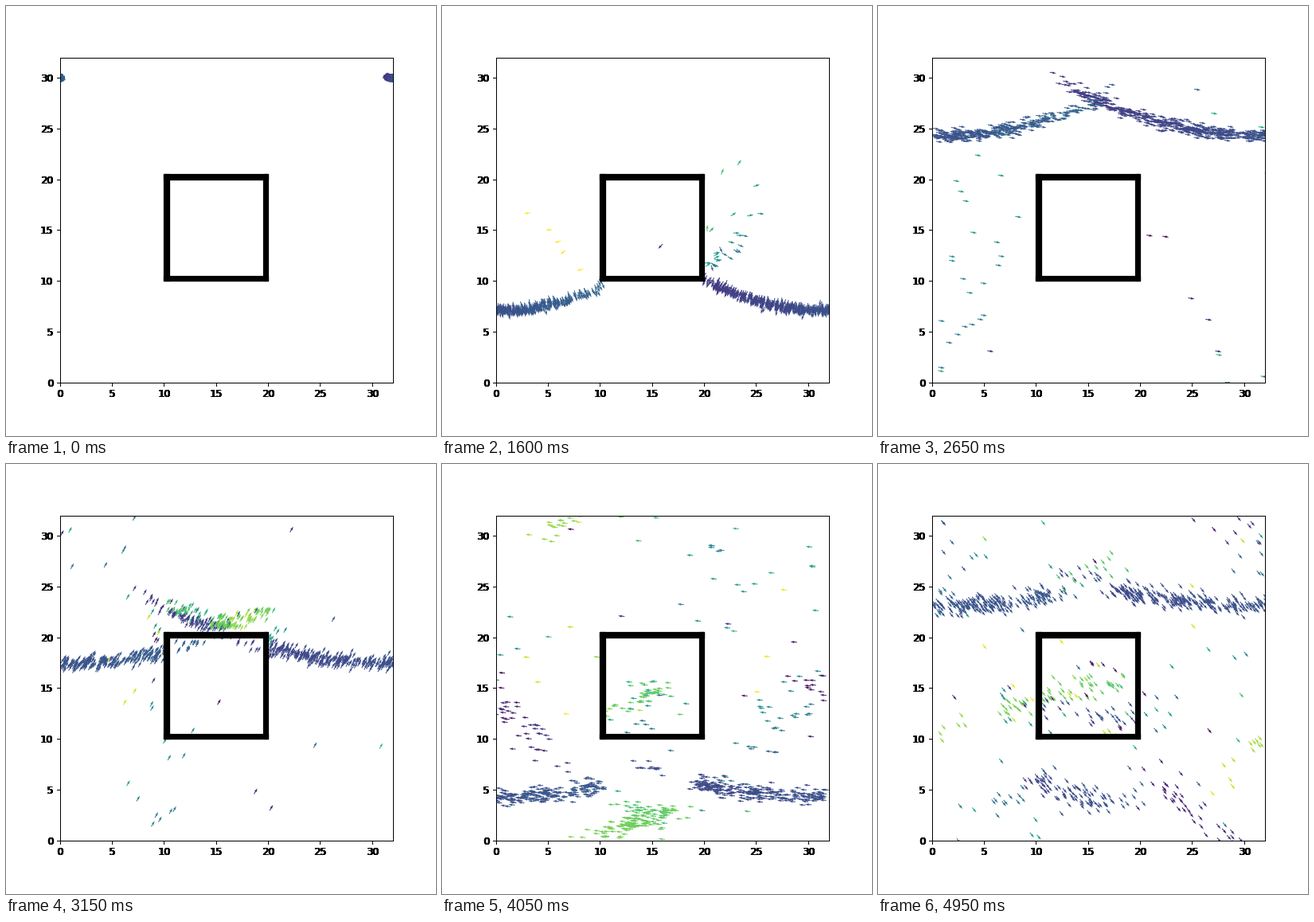
These frames come from a looping animation (540 by 540 pixels, 5 s). A matplotlib script:

```python
import numpy as np
import matplotlib.pyplot as plt
from matplotlib.animation import FuncAnimation
from matplotlib.patches import Rectangle
from matplotlib.transforms import ScaledTranslation

SIZE, DPI = 540, 90
L = 32.0
N = 800
FRAMES = 100
SPEED = 0.718
JITTER = 0.04
TURN_NOISE = 0.025

# Flocking: pull towards the mean heading of close neighbours
ALIGN_START = 45
ALIGN_RADIUS = 1.0
ALIGN_PULL = 0.15

# Wall strips as x0, y0, x1, y1
SIDES = [(10, 10, 10.5, 20.5), (19.5, 10, 20, 20.5)]
CAPS = [(10, 10, 20, 10.5), (10, 20, 20, 20.5)]


def inside(pos, strip):
    x0, y0, x1, y1 = strip
    x, y = pos.T
    return (x > x0) & (x < x1) & (y > y0) & (y < y1)


def align(pos, angle):
    gap = pos[:, None] - pos
    gap -= L * np.round(gap / L)
    near = (gap ** 2).sum(axis=2) < ALIGN_RADIUS ** 2
    unit = np.exp(1j * angle)
    return np.angle(unit + ALIGN_PULL * (near @ unit) / near.sum(axis=1))


def advance(pos, angle, rng):
    step = SPEED * np.column_stack([np.cos(angle), np.sin(angle)])
    return (pos + step + rng.normal(0, JITTER, (N, 2))) % L


def simulate(seed=4):
    """Return positions and headings for every frame."""
    rng = np.random.default_rng(seed)
    angle = -np.pi / 2 + rng.uniform(-0.48, 0.27, N) + rng.normal(0, 0.1, N)
    pos = advance(np.tile([-0.1, 31.0], (N, 1)), angle, rng)
    track = [(pos, angle)]
    for frame in range(1, FRAMES):
        if frame > ALIGN_START:
            angle = align(pos, angle)
        angle = angle + rng.normal(0, TURN_NOISE, N)
        new = advance(pos, angle, rng)

        cap_hit = inside(new, CAPS[0]) | inside(new, CAPS[1])
        side_hit = (inside(new, SIDES[0]) | inside(new, SIDES[1])) & ~cap_hit
        # Caps mirror the heading, sides scatter it around their normal
        bounced = -angle + rng.normal(0, 0.2, N)
        normal = np.where(np.cos(angle) > 0, np.pi, 0.0)
        scattered = normal + rng.normal(0, 0.7, N)
        angle = np.where(cap_hit, bounced, np.where(side_hit, scattered, angle))

        pos = np.where((cap_hit | side_hit)[:, None], pos, new)
        track.append((pos, angle))
    return track


# From this frame on all arrows share one direction
COMMON_START = 50
KEY_FRAMES = [50, 63, 81, 93, 99]
KEY_DEGREES = [-30, 60, 175, 340, 310]


def arrow_angle(frame, angle):
    if frame < COMMON_START:
        return angle
    shared = np.radians(np.interp(frame, KEY_FRAMES, KEY_DEGREES))
    return np.full(N, shared)


track = simulate()

fig = plt.figure(figsize=(SIZE / DPI, SIZE / DPI), dpi=DPI, facecolor="white")
rect = [0.125, 0.125, 0.775, 0.755]
ax = fig.add_axes(rect)

# Stacked copies, half of them nudged, give the heavy tick labels
layers = [ax] + [fig.add_axes(rect, frameon=False) for _ in range(5)]
nudge = ScaledTranslation(1 / DPI, 0, fig.dpi_scale_trans)
for i, layer in enumerate(layers):
    layer.set(xlim=(0, L), ylim=(0, L))
    layer.set_xticks(range(0, 31, 5))
    layer.set_yticks(range(0, 31, 5))
    layer.tick_params(labelsize=10, labelfontfamily="DejaVu Sans")
    if i % 2:
        for label in layer.get_xticklabels() + layer.get_yticklabels():
            label.set_transform(label.get_transform() + nudge)

for x0, y0, x1, y1 in SIDES + CAPS:
    ax.add_patch(Rectangle((x0, y0), x1 - x0, y1 - y0, fc="black", ec="black",
                           lw=1, zorder=2.2))

start, heading = track[0]
arrows = ax.quiver(start[:, 0], start[:, 1], np.cos(heading), np.sin(heading),
                   heading, cmap="viridis", clim=(-np.pi, np.pi), zorder=1.5)


def update(frame):
    pos, angle = track[frame]
    shown = arrow_angle(frame, angle)
    arrows.set_offsets(pos)
    arrows.set_UVC(np.cos(shown), np.sin(shown), angle)
    return (arrows,)


anim = FuncAnimation(fig, update, frames=FRAMES, interval=50, repeat=True,
                     repeat_delay=0, blit=False)
plt.show()
```
